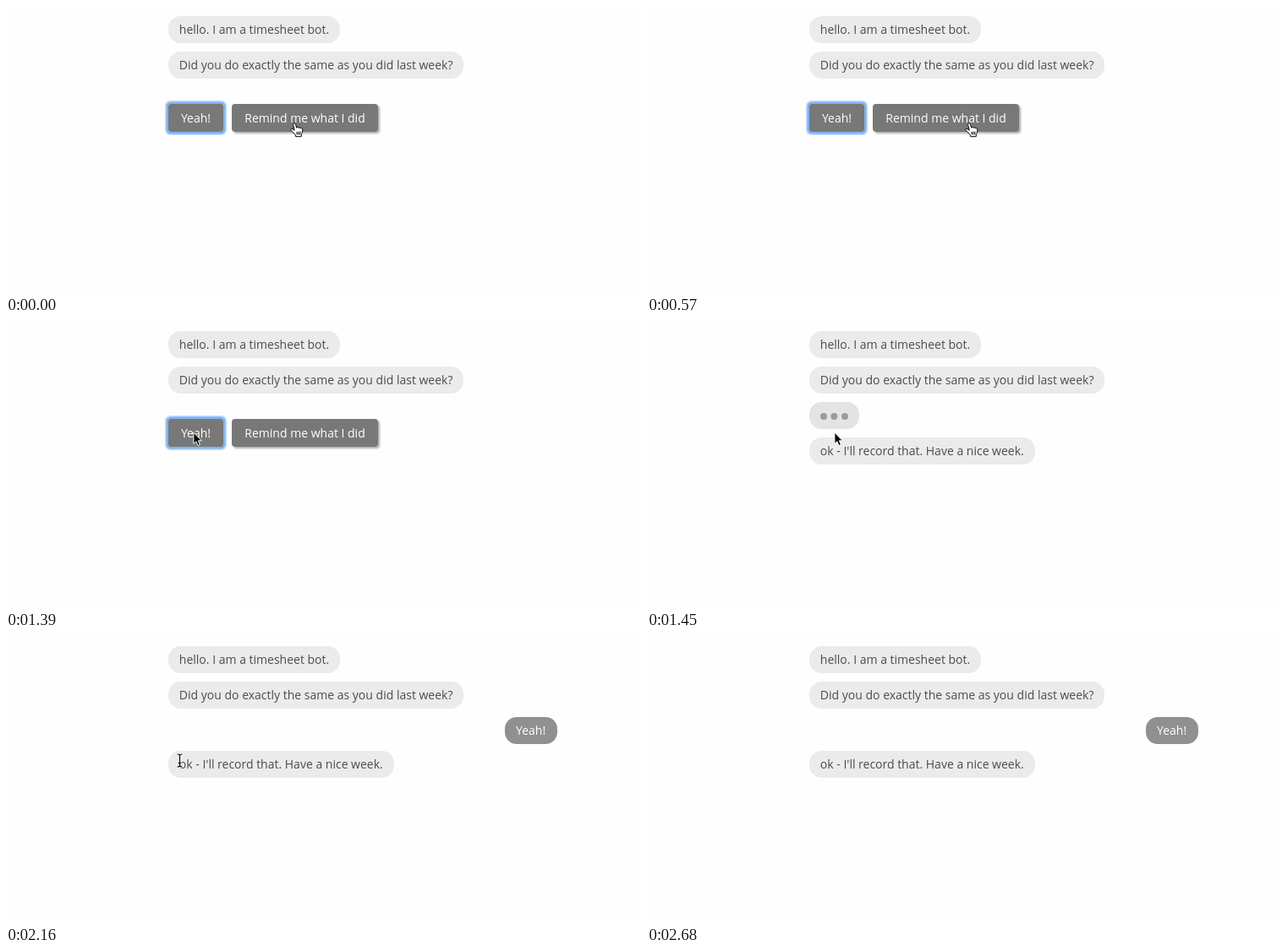
An HTML page for the animation above (4820 ms loop, 751x340 px).

```html
<!DOCTYPE html>
<html lang="en">
<head>
<meta charset="utf-8">
<title>Timesheet bot</title>
<style>
  html, body { margin: 0; width: 100%; height: 100%; overflow: hidden; background: #fefefe; }
  svg { display: block; width: 751px; height: 340px; }
  text { font: 14px "Open Sans", "Noto Sans", sans-serif; fill: #4c4c4c; }
  .bubble { fill: #ebebeb; }
  .light { fill: #fff; text-anchor: middle; }
  .button { fill: #777877; }
</style>
</head>
<body>
<svg viewBox="0 0 751 340" xmlns="http://www.w3.org/2000/svg">
  <defs>
    <filter id="shadow" x="-10%" y="-20%" width="120%" height="150%">
      <feDropShadow dx="2" dy="2" stdDeviation="1.2" flood-color="#000" flood-opacity=".32"/>
    </filter>
  </defs>

  <rect class="bubble" x="192" y="12" width="203" height="32" rx="14.5"/>
  <text x="204.8" y="33">hello. I am a timesheet bot.</text>
  <rect class="bubble" x="192" y="54" width="349" height="32" rx="14.5"/>
  <text x="204.8" y="75">Did you do exactly the same as you did last week?</text>

  <g id="choices">
    <rect x="190" y="114" width="69" height="37" rx="4" fill="none" stroke="#c3dcfb" stroke-width="4"/>
    <rect x="190.75" y="114.75" width="67.5" height="35.5" rx="4" fill="none" stroke="#7db3f5" stroke-width="2.5"/>
    <rect class="button" x="192" y="116" width="65" height="33" rx="3"/>
    <text class="light" x="224.5" y="138">Yeah!</text>
    <rect class="button" x="267" y="116" width="173" height="33" rx="4" filter="url(#shadow)"/>
    <text class="light" x="353.5" y="138">Remind me what I did</text>
  </g>

  <g id="typing">
    <rect x="192" y="96" width="59" height="32" rx="14.5" fill="#e4e4e4"/>
    <g fill="#9b9b9b">
      <circle cx="209" cy="113" r="4"/>
      <circle cx="221.3" cy="113" r="4"/>
      <circle cx="234" cy="113" r="4"/>
    </g>
  </g>

  <g id="answer">
    <rect x="590" y="96" width="62" height="32" rx="14" fill="#8f908f"/>
    <text class="light" x="620.6" y="117">Yeah!</text>
  </g>

  <g id="reply">
    <rect class="bubble" x="192" y="0" width="267" height="32" rx="14.5"/>
    <text x="204.8" y="21">ok - I'll record that. Have a nice week.</text>
  </g>

  <g id="cursor">
    <g id="hand" stroke="#000" stroke-linejoin="round" stroke-linecap="round">
      <path fill="#fff" d="M-1.4 2.2C-1.9 .1 .9 -.3 1.5 1.7L2.7 5.8C3.2 4.6 5 4.8 5.3 6C5.9 5 7.4 5.4 7.6 6.5C8.5 5.8 9.6 6.4 9.7 7.6C9.8 10 9.5 11.5 8.4 13L8.2 16.2H1.7L1.3 14.4L-1.2 11.4L-4 8.9C-5 7.6 -3.4 6.3 -2.1 7.2L-.1 8.6Z"/>
      <path fill="none" d="M2.9 10.8L3.2 13.6M4.9 10.6V13.6M6.9 10.5L6.7 13.6"/>
    </g>
    <path id="arrow" fill="#000" stroke="#fff" stroke-linejoin="round"
      d="M.4 .7V14L3.4 11.2L5.5 16.1L7.9 15.1L5.8 10.3H9.8Z"/>
    <g id="beam" fill="none" stroke-linecap="round">
      <path stroke="#fff" stroke-width="2.6" d="M-2.5 -7.5Q0 -7.5 0 -5.5Q0 -7.5 2.5 -7.5M0 -5.5V5.5M-2.5 7.5Q0 7.5 0 5.5Q0 7.5 2.5 7.5M-1.5 3H1.5"/>
      <path stroke="#000" stroke-width="1.2" d="M-2.5 -7.5Q0 -7.5 0 -5.5Q0 -7.5 2.5 -7.5M0 -5.5V5.5M-2.5 7.5Q0 7.5 0 5.5Q0 7.5 2.5 7.5M-1.5 3H1.5"/>
    </g>
  </g>
</svg>
<script>
  const LOOP = 4820, SENT = 1450, SETTLED = 1560;

  // Each pose holds until the next one: start time, shape, x, y
  const poses = [
    [0, 'hand', 341, 138.5],
    [60, 'hand', 369, 138.5],
    [150, 'hand', 382, 138.5],
    [570, 'hand', 381, 138.5],
    [630, 'hand', 347, 142],
    [690, 'hand', 285, 144],
    [740, 'hand', 238, 138],
    [800, 'hand', 222, 133],
    [1390, 'arrow', 221.5, 131.5],
    [2160, 'beam', 205.5, 147.5],
    [2220, 'arrow', 187, 127],
    [2280, 'arrow', 179, 104],
    [2330, 'arrow', 190, 87],
    [2390, 'beam', 210, 78.5],
    [2450, 'arrow', 243.5, 87.5],
    [2510, 'arrow', 393, 117.5],
    [2570, 'arrow', 562, 208],
    [2620, 'arrow', 689, 297.5],
    [2680, 'none', 0, 0]
  ];

  const el = id => document.getElementById(id);
  const show = (id, on) => el(id).setAttribute('display', on ? 'inline' : 'none');
  const place = (id, x, y) => el(id).setAttribute('transform', `translate(${x} ${y})`);

  function draw(t) {
    show('choices', t < SENT);
    show('typing', t >= SENT && t < SETTLED);
    show('answer', t >= SETTLED);
    show('reply', t >= SENT);
    place('reply', 0, t < SETTLED ? 138 : 136);

    const [, shape, x, y] = poses.findLast(pose => pose[0] <= t);
    for (const id of ['hand', 'arrow', 'beam']) show(id, id === shape);
    place('cursor', x, y);
  }

  const start = performance.now();
  function tick() {
    draw((performance.now() - start) % LOOP);
    requestAnimationFrame(tick);
  }
  tick();
</script>
</body>
</html>
```
